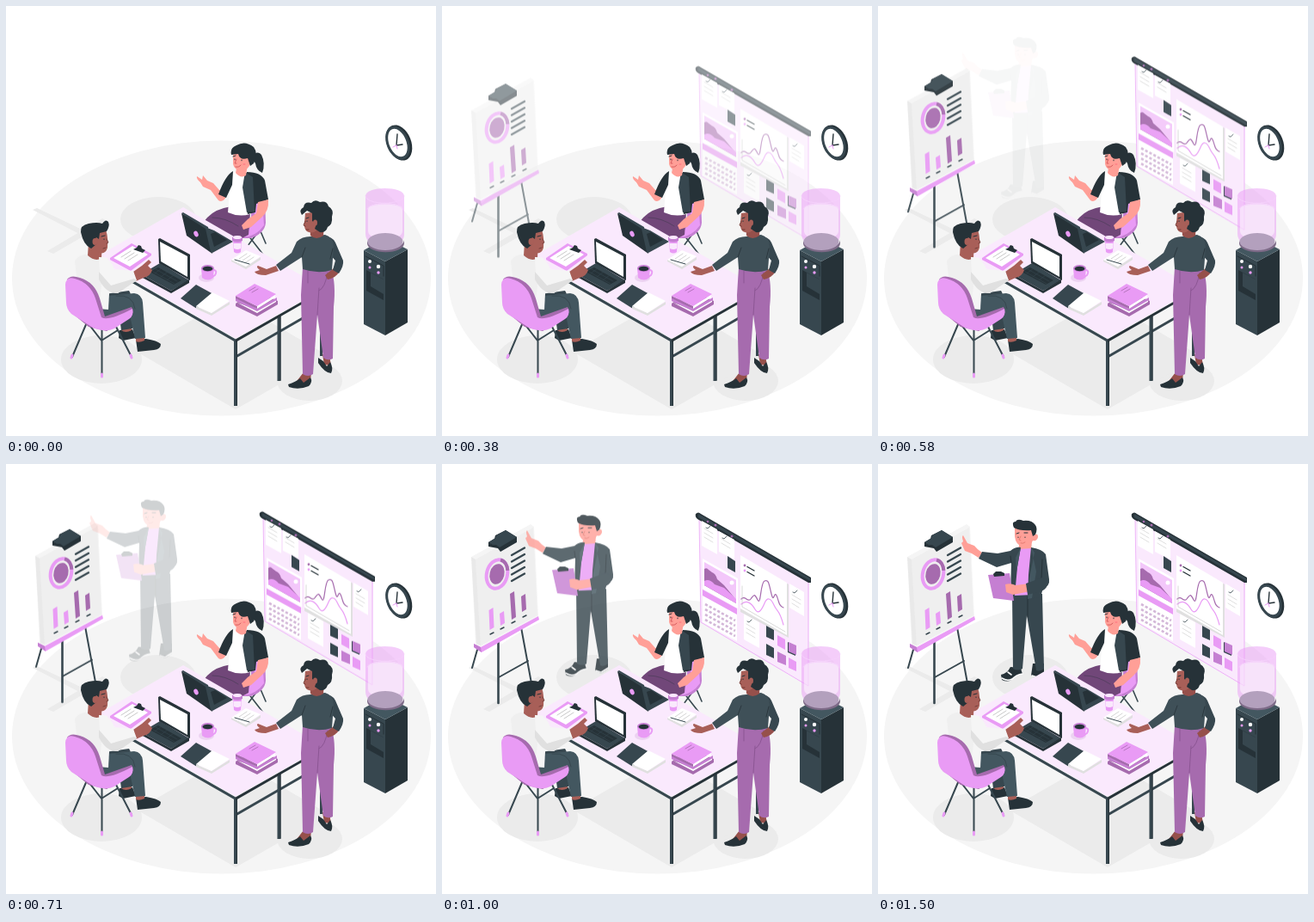
An HTML page for the animation above (1540 ms loop, 500 px wide and 500 px high).

```html
<!DOCTYPE html>
<html lang="en">
<head>
<meta charset="utf-8">
<title>Team meeting</title>
<style>
html, body { margin: 0; width: 100%; height: 100%; overflow: hidden; background: #fff; }
svg { display: block; width: 100vw; height: 100vh; stroke-linecap: round; stroke-linejoin: round; }

.k { fill: #263238 } .g { fill: #37474f } .m { fill: #435760 }
.p { fill: #e99bf5 } .q { fill: #c57fd2 } .u { fill: #a66bae } .l { fill: #fae9fd }
.w { fill: #fff } .e { fill: #ebebeb } .f { fill: #f5f5f5 } .s { fill: #e0e0e0 }
.skin { fill: #ff9f97 } .brown { fill: #a85f58 } .deep { fill: #96504b }
.ln { fill: none }
.sk { stroke: #263238 } .sg { stroke: #37474f } .sp { stroke: #e99bf5 } .su { stroke: #a66bae }
.sw { stroke: #fff } .ss { stroke: #c9c9c9 }

.rise { animation: rise 1540ms infinite }
.drop { animation: drop 1540ms infinite }
@keyframes rise {
  0% { opacity: 0; transform: translateY(30px); animation-timing-function: cubic-bezier(.34, 0, .485, 1.38) }
  63%, 100% { opacity: 1; transform: none }
}
@keyframes drop {
  0% { opacity: 0; transform: translateY(-30px) }
  30.2% { opacity: 0; transform: translateY(-30px); animation-timing-function: cubic-bezier(.36, -.01, .5, 1.38) }
  95.1%, 100% { opacity: 1; transform: none }
}
</style>
</head>
<body>
<svg viewBox="0 0 500 500">

<g id="floor">
  <ellipse class="f" cx="250.5" cy="316.5" rx="243.5" ry="160"/>
  <g class="e">
    <ellipse cx="177" cy="248" rx="44" ry="26"/>
    <ellipse cx="111" cy="411" rx="47" ry="28"/>
    <ellipse cx="353" cy="436" rx="38" ry="23"/>
    <path d="M152 402L267 469 375 407 260 340z"/>
    <path d="M31 237L36 235 97 264 91 268zM48 285L112 247 119 251 55 288z"/>
  </g>
</g>

<g id="clock" transform="rotate(-22 457 159)">
  <ellipse class="k" cx="457" cy="159" rx="14" ry="21.5"/>
  <ellipse class="g" cx="455.5" cy="158.5" rx="13" ry="20.5"/>
  <ellipse class="w" cx="455.5" cy="158.5" rx="10" ry="17"/>
</g>
<path class="ln sk" stroke-width="1.4" d="M455 149L454 162 461 161"/>
<path class="ln sp" d="M454 162L450 164M454 162L455 166"/>

<g id="wallboard" class="rise">
  <path class="l" d="M299 62L427 136 426 259 301 184z"/>
  <path class="ln sp" stroke-width=".7" d="M299 64L301 184 426 258V138"/>
  <path class="k" d="M295 58q3-3 6 0L429 132v6L426 138 297 64q-3-2-2-6z"/>
  <path class="g" d="M298 58L428 133v3L298 62z"/>
  <g class="w">
    <path d="M302 66L320 76V105L302 95zM322 78L340 88V111L322 102z"/>
    <path d="M404 139L421 149V177L404 167zM351 174L369 184V214L351 204z"/>
    <path class="s" d="M347 108L403 140V202L347 172z"/>
    <path d="M347 106L401 138V199L347 168z"/>
    <path d="M303 110L344 133V168L303 145z"/>
  </g>
  <path class="ln ss" stroke-width=".6" d="M305 75l10 6m-10-1l10 6m-10-1l10 6M325 87l10 6m-10-1l10 6M407 152l10 6m-10-1l10 6m-10-1l8 5M354 186l10 6m-10-1l10 6m-10-1l10 6"/>
  <path class="ln sg" stroke-width=".8" d="M307 74l2 1 3-3M326 86l2 1 3-3M408 149l2 1 3-3M355 183l2 1 3-3"/>
  <g class="u"><circle cx="318" cy="71" r="1.5"/><circle cx="337" cy="84" r="1.5"/><circle cx="309" cy="67" r="1.3"/></g>
  <path class="g" d="M332 107L341 113V126L332 121z"/>
  <path d="M305 114L342 135V162L305 141z" fill="#f3c7fa"/>
  <path class="u" d="M305 122q3-2 5 1l4 3q4 1 6 8l8 7 14 17v4L305 141z"/>
  <path class="p" d="M305 136q6-3 12 4l11 4 14 13v5L305 141z"/>
  <circle class="w" cx="337" cy="138" r="2.5"/>
  <path class="w" d="M303 149L343 171V206L303 184z"/>
  <path class="p" d="M303 146L343 168V175L303 153z"/>
  <path class="ln" stroke="#d3b7d8" stroke-width="2.6" stroke-dasharray="3.2 2.2" stroke-linecap="butt" d="M306 163L341 182M306 169L341 188M306 175L341 194M306 181L341 200"/>
  <g class="ln">
    <path class="su" stroke-width="1.2" d="M348 157C353 152 355 162 359 157S363 150 367 158 370 138 375 136 380 139 383 151 386 147 389 153 391 165 397 167"/>
    <path class="sp" stroke-width="1.2" d="M348 163C354 157 360 162 364 169S372 169 375 162 382 155 386 164 392 168 397 187"/>
    <path class="ss" stroke-width=".7" d="M349 142V166L399 195"/>
    <path class="sk" stroke-width="1.4" d="M355 119.500l8 4.500M355 125.500l8 4.500"/>
  </g>
  <circle class="u" cx="352" cy="118" r="1.4"/><circle class="p" cx="352" cy="124" r="1.4"/>
  <path class="g" d="M377 188L386 193V205L377 201zM377 209L386 214V226L377 222zM402 207L411 212V223L402 219z"/>
  <path class="p" d="M390 199L399 204V216L390 211zM403 225L412 230V241L403 237z"/>
  <path class="q" d="M390 218L400 223V234L390 230zM403 207L412 211V222L403 218z"/>
</g>

<g id="cooler">
  <path class="g" d="M416 284L441 297V383L416 370z"/>
  <path class="k" d="M441 297L467 283V368L441 383z"/>
  <path class="m" d="M416 284L441 270 467 283 441 297z"/>
  <path class="k" d="M419 307L439 318V342L419 331z"/>
  <path class="g" d="M424 310L439 318V335L424 326z"/>
  <path class="ln sk" d="M418 291L439 302V314"/>
  <g class="w"><circle cx="423" cy="297" r="2"/><circle cx="433" cy="303" r="2.2"/></g>
  <g class="p"><circle cx="423" cy="304" r="1.5"/><circle cx="433" cy="310" r="1.7"/></g>
  <path d="M420 272a21 10 0 0 0 43 0v4a21 10 0 0 1-43 0z" fill="#7d6a87"/>
  <path class="p" opacity=".5" d="M418 221C418 209 463 209 463 221V265C463 287 419 287 418 265z"/>
  <path class="w" opacity=".48" d="M421 236C421 227 461 227 461 236V262C461 274 421 274 421 262z"/>
  <ellipse cx="441" cy="274" rx="20.500" ry="10" fill="#b3a0bd"/>
  <path class="ln" stroke="#f5d0fb" d="M418 221C419 232 462 232 463 221M420 236C421 228 461 228 461 236"/>
</g>

<g id="easel" class="rise">
  <path class="ln sg" stroke-width="2" d="M41 216L35 237M92 190L104 255M66 248L100 229"/>
  <path class="ln sg" stroke-width="2.600" d="M65.500 205V278"/>
  <path class="f" d="M34 108L103 70 107 73 112 177 44 213 39 210z"/>
  <path d="M39 111L106 74 111 176 45 211z" fill="#efefef"/>
  <path class="s" d="M34 108L39 111 45 211 40 209z" opacity=".55"/>
  <path class="p" d="M37 209L45 213 112 177 113 181 46 219 37 213z"/>
  <path class="q" d="M37 209L45 213 46 219 37 213z"/>
  <path class="k" d="M54 91L61 87 62 83 74 77 87 85V91L68 102 65 98 54 96z"/>
  <path class="g" d="M54 91L62 86 63 83 74 77 87 85 67 97 63 94 59 94z"/>
  <g transform="rotate(14 64 128)">
    <ellipse class="ln sp" stroke-width="4" cx="64" cy="128" rx="12" ry="17"/>
    <ellipse class="u" cx="64" cy="128" rx="8.500" ry="12"/>
    <path class="ln su" stroke-width="4" stroke-linecap="butt" d="M64 111a12 17 0 0 1 11 10"/>
  </g>
  <path class="ln sg" stroke-width="2.300" d="M81 106l15-8.500m-15 16l15-8.500m-15 16l15-8.500m-15 16l15-8.500m-15 16l15-8.500"/>
  <path class="p" d="M54.500 170l5-3 1 23-5 3zM67 174l5-3 1 14-5 3z"/>
  <path class="u" d="M79 151l5-3 2 30-5 3zM92 154l5-3 1 18-5 3z"/>
  <path class="ln sg" stroke-width="1.400" d="M56 198l4-2m8-4l4-2m9-5l4-2m9-5l4-2"/>
</g>

<g id="presenter" class="drop">
  <path class="k" d="M143 245q7-1 11-9l12 1q1 5 2 7-8 2-13 7-5 3-11 0zM180 232h13v12l-8 5-7-3z"/>
  <path class="ln sw" stroke-width="1.600" d="M144 249q6 4 12 1 5-5 12-6M151 242l4 3M179 246l6 2 8-5"/>
  <path class="g" d="M156 150L191 151 193 238q-5 4-9 2L173 176 168 238q-5 3-11 0z"/>
  <path class="ln sk" d="M174 154V178"/>
  <path class="skin" d="M165 88H179L178 103 170 108 163 101z"/>
  <path class="p" d="M163 99L179 98 182 152 158 153z"/>
  <path class="skin" d="M121 103Q115 99 112 95L104 92 99 83Q97 84 99 90L97 92 101 101 109 104 117 109z"/>
  <path class="g" d="M166 97Q160 96 154 101L139 104 121 102 117 110 138 120 155 115 154 151 159 153 162 120z"/>
  <path class="g" d="M178 97Q191 99 195 105L199 134Q200 142 192 144L189 155 174 157 175 129z"/>
  <path class="m" d="M178 97L182 103 176 133 174 157 179 156 184 125zM166 97L161 125 160 109z"/>
  <path class="ln sk" d="M191 111L190 134M155 115L154 107"/>
  <path class="q" d="M128 129L153 127 158 159 134 156z"/>
  <path class="k" d="M134 128l3-3h6l4 2v3l-12 1z"/>
  <path class="skin" d="M148 140Q154 138 160 141L176 139 177 148 157 152 149 149z"/>
  <path class="g" d="M172 139L191 132 198 137Q197 145 190 148L174 152z"/>
  <path class="skin" d="M159 74Q169 70 180 75L181 83Q186 79 186 85 185 90 180 89 177 97 168 96 160 94 159 84z"/>
  <path class="k" d="M158 74Q155 67 160 67 162 63 169 66 179 65 183 71 186 75 183 82L180 84 178 77Q165 78 158 74z"/>
  <path class="ln sk" d="M161 81l3-1m6 0l4 0M163 85v.5m8-.5v.5"/>
  <path class="ln" stroke="#e57a72" d="M166 84l-2 4 2 1M166 92q3 1 5-1"/>
</g>

<g id="listener">
  <path class="ln sg" stroke-width="1.600" d="M278 262L299 289M295 260L281 279M296 262L302 276"/>
  <path class="q" d="M285 216Q298 211 301 224L302 252Q301 264 285 270L268 270 285 250z"/>
  <path class="p" d="M289 217Q297 215 298 225L300 255Q291 268 276 269L289 250z"/>
  <path class="skin" d="M254 213L248 214 241 206 234 203 229 197 228 202 222 198Q221 201 226 205L229 210 238 214 247 226Q252 229 256 222z"/>
  <path fill="#714779" d="M262 233Q243 236 234 246L229 252 265 275 282 266 284 241z"/>
  <path class="ln sk" opacity=".35" d="M240 246Q255 246 270 256"/>
  <path class="w" d="M263 194Q274 190 282 194L284 242Q271 246 258 240L260 215z"/>
  <path class="k" d="M264 192Q255 197 247 219L256 223 263 208zM280 193Q297 193 301 203L305 225 291 230 290 240 281 242 276 210z"/>
  <path class="g" d="M278 193L287 199 289 239 280 240 275 211z"/>
  <path class="skin" d="M293 228L305 225Q306 239 297 246L285 257 276 260 274 255 281 248 291 241zM269 184H281L279 197Q273 201 267 194z"/>
  <path class="k" d="M285 175Q293 167 297 173 302 183 298 194 291 191 290 183z"/>
  <path class="skin" d="M264 173Q272 168 285 174L284 184Q280 193 271 191 263 189 264 180z"/>
  <path class="k" d="M262 173Q260 165 268 162 278 156 288 164 294 172 288 183L284 186 281 177Q272 180 270 172z"/>
  <path class="ln sk" d="M266 178v.8m8 .2v.8M264 175l3-1m6 1l4 1"/>
  <path class="ln" stroke="#d85e60" d="M268 178l-2 5h2M267 187q4 1 6-2"/>
  <path class="ln" stroke="#ff6f7e" d="M276 184h2"/>
</g>

<g id="table">
  <path class="ln sg" stroke-width="3" stroke-linecap="butt" d="M267 408L345 363M366.500 330V407"/>
  <path class="ln sg" stroke-width="4" stroke-linecap="butt" d="M267 388V465M317.500 358V436"/>
  <path class="ln sk" d="M268.500 389V464M319 360V435"/>
  <path class="g" d="M103 293V297L267 391V386z"/>
  <path class="k" d="M267 386L370 328V332L267 391z"/>
  <path class="l" d="M206 234L370 328.500 267 387 103 293z"/>
  <path class="ln sw" stroke-width=".8" d="M103 293L267 387 370 328.500"/>
</g>

<g id="desk">
  <path class="p" d="M121 293L146 276 169 288V290L145 308 121 295z"/>
  <path class="w" d="M125 293L147 279 165 289 144 303z"/>
  <path class="ln ss" d="M134 292l11-7m-7 9l11-7m-7 9l11-7"/>
  <path class="k" d="M148 283l4-2 2-3 3 1 1 3 4 2-3 3z"/>

  <path class="k" d="M204 241L234 258 240 288 210 267z"/>
  <path class="g" d="M204 241l2-1 29 17 5 30-2-1-6-27zM234 258L242 261 264 274 240 287z"/>
  <path class="k" d="M238 265L243 263 257 272 242 280z"/>
  <ellipse class="p" cx="221" cy="265" rx="2.500" ry="3.500" transform="rotate(-25 221 265)"/>

  <path class="g" d="M179 299L213 319 192 331 157 312z"/>
  <path class="k" d="M157 312V315L192 334 213 322V318L192 331zM177 304L204 319 195 324 167 309z"/>
  <path class="ln sg" stroke-width=".6" d="M174 306l25 14m-28-11l25 14M181 305l-8 6m15-2l-8 6m15-2l-8 6"/>
  <path class="k" d="M177 271L179 270 214 289V319L178 299z"/>
  <path class="w" d="M179 274L211 291V315L180 297z"/>

  <ellipse cx="233" cy="316" rx="9" ry="5" fill="#ecd3f1"/>
  <path class="ln sp" stroke-width="2" d="M242 307q4 1 1 6l-3 2"/>
  <path class="p" d="M227 305H242L241 316Q235 321 228 316z"/>
  <ellipse class="q" cx="234.500" cy="305" rx="7.500" ry="4"/><ellipse class="k" cx="234.500" cy="305.500" rx="5.800" ry="2.800"/>

  <path class="g" d="M203 340L221 324 241 335 222 352z"/>
  <path class="s" d="M221 349L239 357 260 344V347L239 360 221 352z"/>
  <path class="w" d="M221 349L240 333 260 343 239 357z"/>

  <path class="u" d="M267 346L289 330 316 343V347L292 361 267 349z"/>
  <path class="w" d="M269 345L292 357 314 344V341L292 353z"/>
  <path class="q" d="M267 343L292 355 315 342V339L292 352 267 339z"/>
  <path class="w" d="M269 339L292 352 313 339V336L292 348z"/>
  <path class="u" d="M267 337V340L292 352V349z"/>
  <path class="p" d="M267 337L289 323 314 335 292 349z"/>
  <path class="ln su" stroke-width=".8" d="M283 331l7-4m-4 6l7-4"/>

  <path class="s" d="M262 295L279 303 296 292V295L279 306 262 297z"/>
  <path class="w" d="M262 295L279 284 296 291 279 303z"/>
  <path class="ln ss" stroke-width=".8" d="M271 294l9-6m-5 8l9-6m-5 8l9-6"/>
  <path class="ln sg" d="M266 295l17 5"/>
  <path class="p" d="M264 272H274L273 286Q269 289 265 286z"/>
  <path class="l" d="M264.500 276H273.500L273 282Q269 284 265 282z"/>
  <path class="q" d="M263 269q6-4 12 0v4q-6 3-12 0z"/>
  <ellipse class="l" cx="269" cy="269" rx="5" ry="2"/>
</g>

<g id="sitter">
  <path class="k" d="M132 377L147 376 151 386 136 389 131 386zM151 388L163 387Q176 389 180 393 180 399 172 400L153 402z"/>
  <path class="brown" d="M134 368H146V377Q139 381 134 377zM151 381H161V389Q155 392 151 390z"/>
  <path class="g" d="M115 335L143 331Q148 337 147 375L134 377 131 354z"/>
  <path class="m" d="M110 338L149 334Q158 335 159 345L162 386 150 387 144 360 115 367 101 352z"/>
  <path class="ln sg" d="M128 337Q148 335 150 352"/>
  <path class="f" d="M88 289Q79 292 75 312L80 350 119 353 121 316 118 293z"/>
  <path class="s" d="M80 296Q88 286 101 290L112 295 112 317 108 350 85 345z" opacity=".3"/>
  <path class="brown" d="M96 275L112 272 111 293Q104 298 95 290zM148 309L158 302 166 295 169 298 165 302 170 307Q168 314 160 316L151 320z"/>
  <path class="f" d="M108 292Q121 291 126 306L148 308 152 319 130 334Q117 333 109 312z"/>
  <path class="s" d="M108 309L122 325 149 317 152 319 130 334Q117 335 108 318z"/>
  <path class="brown" d="M101 262L116 260Q119 269 118 281 116 289 108 287L101 280z"/>
  <path class="k" d="M87 263Q86 255 96 253 106 251 112 253 116 247 119 251 121 256 117 262L109 264 108 271 105 269 102 273 105 277 99 282Q90 278 87 263z"/>
  <ellipse class="brown" cx="103.500" cy="274" rx="3" ry="4"/>
  <path class="ln sk" d="M111 268l4-1m-1 4v.5"/>
  <path class="ln" stroke="#76403c" d="M117 271l2 4-2 1m-4 6l3-1"/>
  <path class="ln sg" stroke-width="2" d="M94 368L77 408M111.500 373V430M127 371L146 408M97 371L111 389 130 377"/>
  <path class="ln sp" stroke-width="3" d="M77 406l-1 3M111.500 428v3M145 406l1 3"/>
  <path class="u" d="M71 318Q75 312 86 316 103 321 109 340L115 361 146 350Q150 356 144 363L117 378 96 373 73 354z"/>
  <path class="p" d="M69 324Q70 314 80 317 98 322 104 340L111 362Q119 367 147 352 149 360 143 364L126 375Q116 380 101 374L76 358Q70 352 70 345z"/>
</g>

<g id="speaker">
  <path class="deep" d="M346 426H355L354 436 343 440 335 440zM368 405L376 406 378 418 370 417z"/>
  <path class="k" d="M328 440Q337 437 342 433L346 438 354 432Q357 437 352 442 340 447 329 443zM363 409L369 413 373 419 377 414Q381 421 378 427 371 427 363 415z"/>
  <path class="u" d="M345 304L378 306Q384 322 381 350L380 410Q374 413 369 409L362 359 357 428Q351 432 345 428L343 336z"/>
  <path class="ln" stroke="#8c5694" d="M362 359L364 328M374 310Q371 328 364 331M351 308V322"/>
  <path class="brown" d="M314 302L303 306 293 302Q290 303 295 307L289 309Q291 313 302 313L317 308z"/>
  <path class="deep" d="M381 305L388 308Q384 316 374 318L371 313z"/>
  <path class="g" d="M368 267Q380 268 383 275L392 296Q393 302 387 311L380 307 383 296 373 285z"/>
  <path d="M354 268L371 266Q380 268 381 280L379 307Q363 312 345 306L344 292 319 308 314 301 332 287 338 274Q344 268 354 268z" fill="#3f5058"/>
  <path class="ln sk" stroke-width=".8" d="M344 292L348 281M380 282L377 294"/>
  <path class="deep" d="M353 251H370L369 267Q361 273 354 267z"/>
  <path class="brown" d="M348 241L362 239 364 257Q360 265 352 263 346 261 347 252z"/>
  <path class="k" d="M344 243Q340 237 346 234 347 227 355 229 359 224 365 228 373 226 375 233 382 237 379 245 380 254 374 257 372 264 365 263L359 259 361 253 356 250 356 241 350 238z"/>
  <ellipse class="brown" cx="359.500" cy="252" rx="2.500" ry="3.500"/>
  <path class="ln sk" d="M349 247l3-1m-2 4v.5"/>
  <path class="ln" stroke="#73352f" d="M348 250l-2 5 2 1m1 4l3 0"/>
</g>

</svg>
</body>
</html>
```
